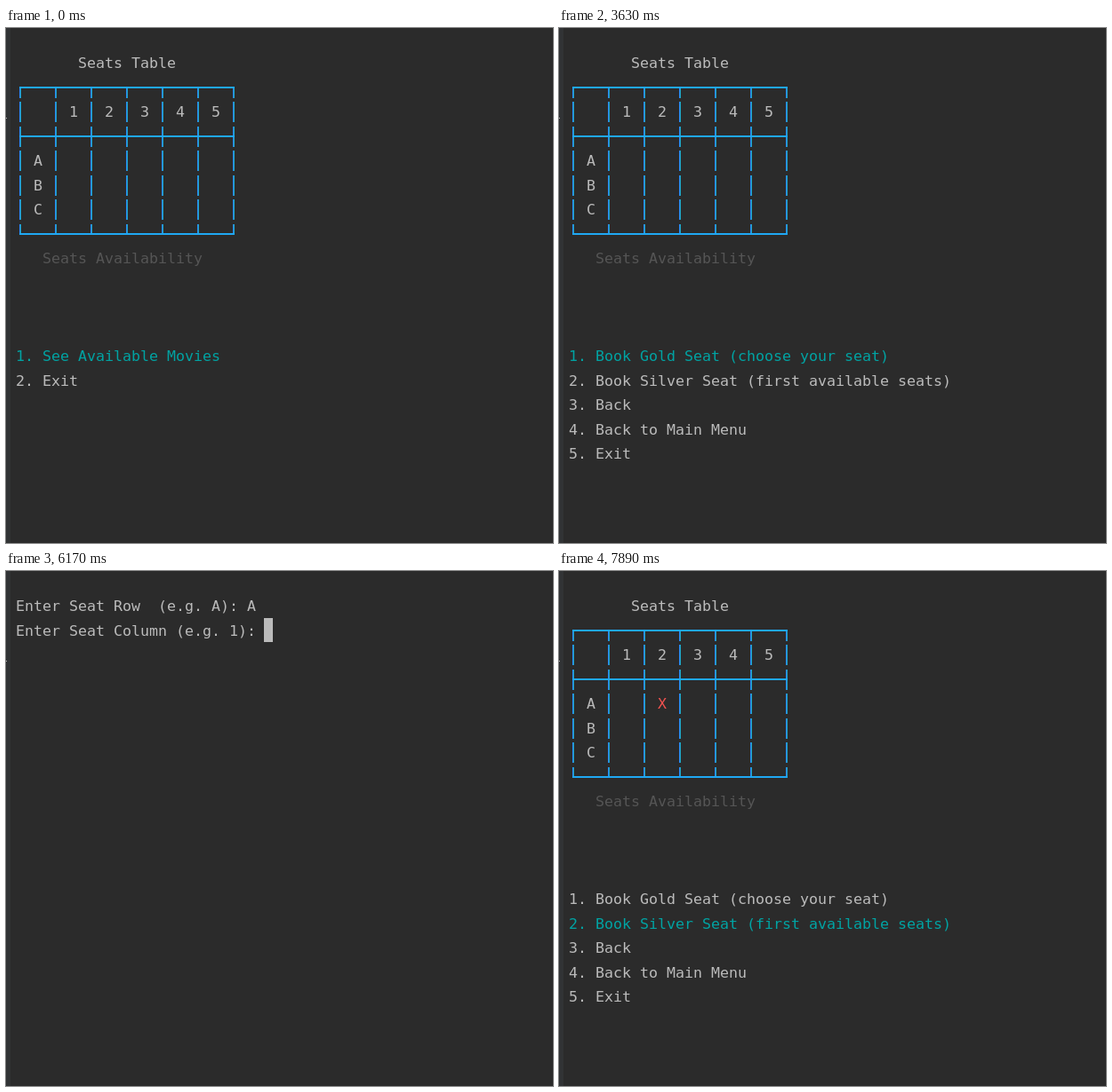
An HTML page that plays this animation: 615x580 px, repeating every 8000 ms.

```html
<!DOCTYPE html>
<html lang="en">
<head>
<meta charset="utf-8">
<title>Seat booking</title>
<style>
  html, body { margin: 0; height: 100%; overflow: hidden; background: #2b2b2b; }
  svg { display: block; width: 615px; height: 580px; }
  text { font: 16.61px "DejaVu Sans Mono", monospace; white-space: pre; }
</style>
</head>
<body>
<svg viewBox="0 0 615 580">
  <rect width="5" height="580" fill="#313335"/>
  <rect y="101" width="1" height="1" fill="#bbb"/>
  <g id="screen"></g>
</svg>
<script>
const GREY = '#bbbbbb', DIM = '#555555', TEAL = '#00a3a3', RED = '#f0524f';
const BLUE = '#1fa8f4', EDGE_LEFT = '#2b86f4', EDGE_RIGHT = '#1fa8c4';
const LOOP = 8000;

// Terminal grid: 10 px columns, 27.5 px rows
const colX = col => 10 + col * 10;
const baseline = row => Math.floor(45.5 + (row - 1) * 27.5);
const cellTop = row => Math.ceil(25 + (row - 1) * 27.5);

const rect = (x, y, w, h, fill) =>
  `<rect x="${x}" y="${y}" width="${w}" height="${h}" fill="${fill}"/>`;
const text = (col, row, str, fill = GREY) =>
  `<text x="${colX(col) + 1}" y="${baseline(row)}" fill="${fill}">${str}</text>`;
const cursor = (col, row) =>
  rect(colX(col), cellTop(row), 10, cellTop(row + 1) - cellTop(row), GREY);

// Vertical strokes carry the colour fringe of subpixel rendering
const stroke = (x, y, h) => rect(x, y, 1, h, EDGE_LEFT) + rect(x + 1, y, 1, h, EDGE_RIGHT);

function table(row, booked) {
  const top = row + 1, bottom = row + 7;
  let out = text(7, row, 'Seats Table') + text(3, row + 8, 'Seats Availability', DIM);
  for (let r = top; r <= bottom; r++) {
    const base = baseline(r), mid = base - 6;
    const from = r === top ? mid : base - 17;
    const to = r === bottom ? mid : base + 6;
    for (let c = 0; c <= 24; c += 4) out += stroke(colX(c) + 5, from, to - from);
    if (r === top || r === top + 2 || r === bottom) out += rect(15, mid - 1, 242, 2, BLUE);
  }
  for (let n = 1; n <= 5; n++) out += text(2 + n * 4, row + 2, n);
  [...'ABC'].forEach((name, i) => out += text(2, row + 4 + i, name));
  if (booked) out += text(10, row + 4, 'X', RED);
  return out;
}

const menu = (items, active) => items.map((item, i) =>
  text(0, 13 + i, `${i + 1}. ${item}`, i === active ? TEAL : GREY)).join('');

const mainMenu = ['See Available Movies', 'Exit'];
const movieMenu = ['The Eighth Ferry by Halvar Ekstrom', 'Back', 'Exit'];
const bookMenu = ['Book Gold Seat (choose your seat)', 'Book Silver Seat (first available seats)',
  'Back', 'Back to Main Menu', 'Exit'];

const askRow = (answer = '') => text(0, 1, 'Enter Seat Row  (e.g. A): ' + answer);
const askBoth = (answer = '') => askRow('A') + text(0, 2, 'Enter Seat Column (e.g. 1): ' + answer);

const scenes = [
  [0, table(1) + menu(mainMenu, 0)],
  [500, table(1) + menu(mainMenu, 1)],
  [900, table(1) + menu(mainMenu, 0)],
  [1300, cursor(0, 0)],
  [1370, table(1) + menu(movieMenu, 0)],
  [3630, table(1) + menu(bookMenu, 0)],
  [4890, askRow() + cursor(26, 1)],
  [5640, askRow('A') + cursor(27, 1)],
  [6090, askBoth()],
  [6170, askBoth() + cursor(28, 2)],
  [6350, askBoth('2') + cursor(29, 2)],
  [6560, askBoth('2') + cursor(0, 3)],
  [6620, askBoth('2') + table(4, true) + menu(bookMenu, 0)],
  [7820, table(1, true)],
  [7890, table(1, true) + menu(bookMenu, 1)]
];

const screenEl = document.getElementById('screen');
let shown;
function draw() {
  const t = performance.now() % LOOP;
  const scene = scenes.findLast(([start]) => start <= t);
  if (scene !== shown) {
    shown = scene;
    screenEl.innerHTML = scene[1];
  }
  requestAnimationFrame(draw);
}
draw();
</script>
</body>
</html>
```
